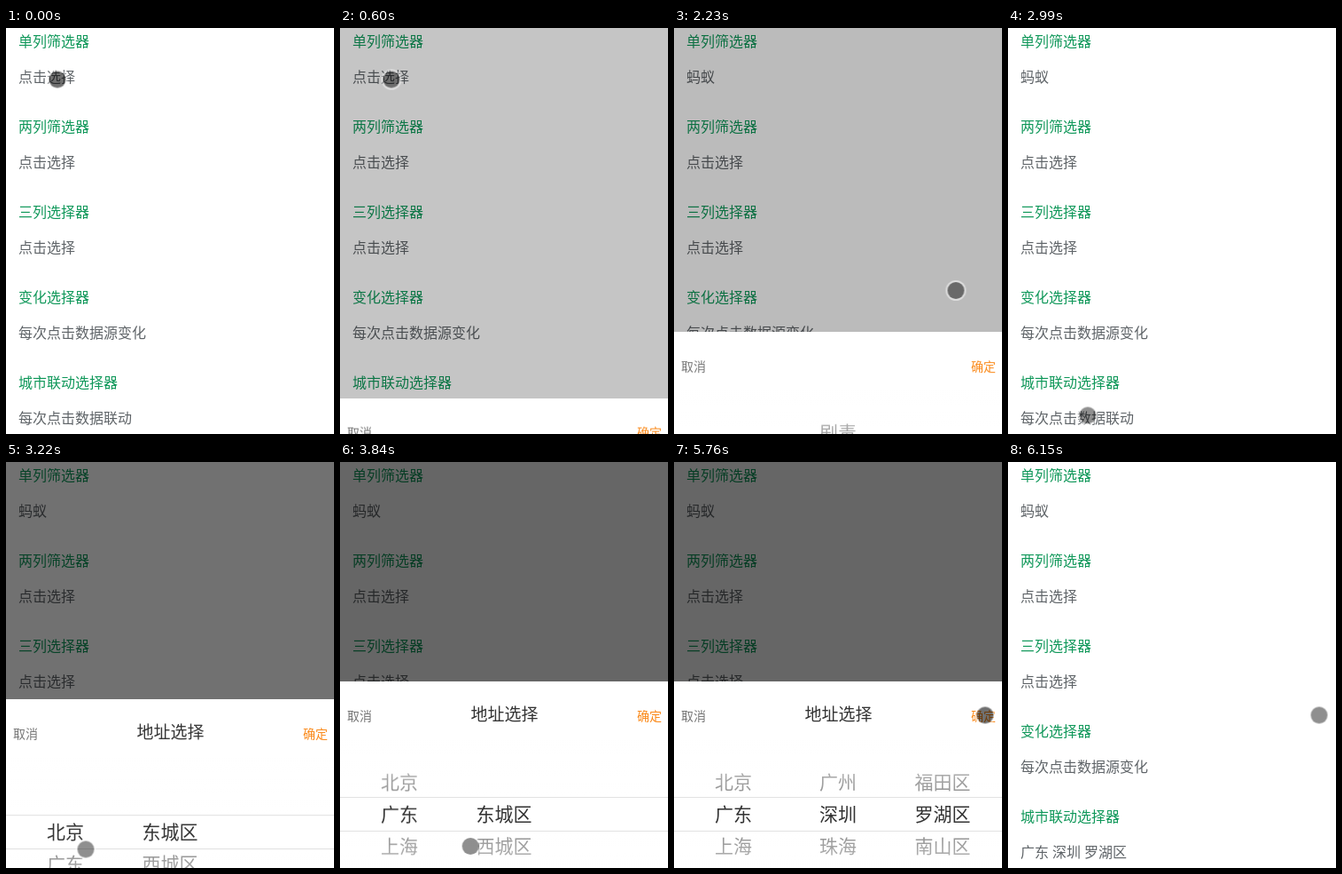
Recreate the animation shown at these times as an HTML page. Size 370 px wide and 457 px high, loop 6310 ms.

```html
<!DOCTYPE html>
<html lang="zh-CN">
<head>
<meta charset="utf-8">
<title>Picker demo</title>
<style>
html, body { margin: 0; width: 100%; height: 100%; overflow: hidden; background: #fff; }
body { position: relative; font-family: "Noto Sans CJK SC", "Noto Sans CJK", "Noto Sans", sans-serif; }
#stage { position: absolute; left: 0; top: 0; width: 370px; height: 457px; overflow: hidden; }
#stage div { position: absolute; white-space: nowrap; }
.head, .value { left: 14px; height: 24px; font-size: 16px; line-height: 24px; }
.head { color: #10985a; }
.value { color: #5f6468; word-spacing: .4px; }
#shade { inset: 0; background: #000; }
#panel { left: 0; top: 247px; width: 370px; height: 273px; background: #fff; }
.button { top: 28px; font-size: 14px; line-height: 20px; }
#cancel { left: 8px; color: #757575; }
#confirm { right: 7px; color: #fa8919; }
.title { top: 23px; width: 371px; text-align: center; font-size: 19px; line-height: 26px; color: #333; }
.wheel { top: 60px; width: 118px; height: 173px; overflow: hidden; }
.list { top: 70px; width: 100%; }
.item { width: 100%; height: 36px; line-height: 36px; font-size: 21px; text-align: center; color: #333; }
.veil { left: 0; width: 100%; height: 70px; }
#upper { top: 60px; border-bottom: 1px solid #e2e2e2;
  background: linear-gradient(to top, rgba(255,255,255,.45), rgba(255,255,255,.85)); }
#lower { top: 168px; border-top: 1px solid #e2e2e2;
  background: linear-gradient(to bottom, rgba(255,255,255,.45), rgba(255,255,255,.85)); }
#cursor { left: -9.5px; top: -9.5px; width: 19px; height: 19px; border-radius: 50%;
  box-shadow: 0 0 0 2px rgba(255,255,255,.5); }
</style>
</head>
<body>
<div id="stage"></div>
<script>
const LOOP = 6310;
const OUT = 'cubic-bezier(.2,.7,.3,1)';
const stage = document.getElementById('stage');

function add(parent, props, text = '') {
  const el = document.createElement('div');
  Object.assign(el, props);
  el.textContent = text;
  parent.append(el);
  return el;
}

// steps: [time, value, easing towards the next step]
function play(el, prop, steps) {
  const all = [...steps, [LOOP, steps[steps.length - 1][1]]];
  const frames = all.map(([time, value, easing = 'linear']) =>
    ({ offset: time / LOOP, [prop]: value, easing }));
  el.animate(frames, { duration: LOOP, iterations: Infinity }).startTime = 0;
}

const hold = (el, prop, steps) =>
  play(el, prop, steps.map(([t, v]) => [t, v, 'steps(1, end)']));

function show(el, from, to = LOOP) {
  const steps = [[0, from === 0 ? 1 : 0]];
  if (from > 0) steps.push([from, 1]);
  if (to < LOOP) steps.push([to, 0]);
  hold(el, 'opacity', steps);
}

// the two times the sheet is open, and the linked changes in between
const visits = [{ open: 530, close: 2164 }, { open: 3020, close: 5840 }];
const CITY = 2700, PROVINCE_SET = 3900, CITY_SET = 4600;

// page
const rows = [
  ['单列筛选器', '点击选择', '蚂蚁', visits[0]],
  ['两列筛选器', '点击选择'],
  ['三列选择器', '点击选择'],
  ['变化选择器', '每次点击数据源变化'],
  ['城市联动选择器', '每次点击数据联动', '广东 深圳 罗湖区', visits[1]]
];
rows.forEach(([head, value, picked, visit], i) => {
  const line = (className, text, dy) => {
    const el = add(stage, { className }, text);
    el.style.top = 96 * i + 2 + dy + 'px';
    return el;
  };
  line('head', head, 0);
  const before = line('value', value, 40);
  if (visit) {
    show(before, 0, visit.close - 40);
    show(line('value', picked, 40), visit.close - 40);
  }
});

// sheet
const shade = add(stage, { id: 'shade' });
const panel = add(stage, { id: 'panel' });
add(panel, { id: 'cancel', className: 'button' }, '取消');
add(panel, { id: 'confirm', className: 'button' }, '确定');
show(add(panel, { className: 'title' }, '地址选择'), CITY);

// go from a to b after each opening and back after each closing
const toggle = (a, b, lead, length) => [[0, a], ...visits.flatMap(({ open, close }) => [
  [open, a, 'ease'], [open + length, b],
  [close - lead, b, 'ease'], [close - lead + length, a]
])];
play(panel, 'transform', toggle('translateY(273px)', 'translateY(0px)', 0, 300));
play(shade, 'opacity', toggle(0, .6, 30, 300));

// a column of choices, scrolled by one item at the given time
function wheel(col, items, from, to, scroll) {
  const box = add(panel, { className: 'wheel' });
  box.style.left = 8 + 118 * col + 'px';
  const list = add(box, { className: 'list' });
  items.split(' ').forEach((text, i) => {
    add(list, { className: 'item' }, text).style.top = 36 * i + 'px';
  });
  show(box, from, to);
  if (scroll) play(list, 'transform', [
    [0, 'translateY(0px)'],
    [scroll, 'translateY(0px)', OUT],
    [scroll + 220, 'translateY(-36px)']
  ]);
}
wheel(1, '剧毒 蚂蚁 幽灵', 0, CITY, 1240);
wheel(0, '北京 广东 上海', CITY, LOOP, 3650);
wheel(1, '东城区 西城区', CITY, PROVINCE_SET);
wheel(1, '广州 深圳 珠海', PROVINCE_SET, LOOP, 4340);
wheel(2, '越秀区 荔湾区', PROVINCE_SET, CITY_SET);
wheel(2, '福田区 罗湖区 南山区', CITY_SET, LOOP, 5030);
add(panel, { id: 'upper', className: 'veil' });
add(panel, { id: 'lower', className: 'veil' });

// touch pointer: arrives, taps, and goes on with a slowing move
const cursor = add(stage, { id: 'cursor' });
const stops = [
  { x: 57.5, y: 57.5, at: 0, tap: 0, go: 840 },
  { x: 162, y: 442, at: 1110, tap: 1200, go: 1350 },
  { x: 334, y: 291, at: 1810, tap: 1900, go: 2100 },
  { x: 317.5, y: 295, at: 2230, go: 2235 },
  { x: 89.5, y: 435.5, at: 2680, tap: 2700, go: 3330 },
  { x: 72, y: 432, at: 3520, tap: 3650, go: 3745 },
  { x: 186, y: 432, at: 4150, tap: 4300, go: 4480 },
  { x: 296.5, y: 429.5, at: 4910, tap: 4985, go: 5170 },
  { x: 350.5, y: 284.5, at: 5520, tap: 5690, go: 6300 }
];
play(cursor, 'transform', stops.flatMap(({ x, y, at, go }) => {
  const place = `translate(${x}px, ${y}px)`;
  return [[at, place], [go, place, OUT]];
}));
hold(cursor, 'backgroundColor', stops.filter(s => 'tap' in s).flatMap(({ tap, go }) => [
  [tap, 'rgba(0,0,0,.56)'],
  [Math.min(tap + 280, go), 'rgba(0,0,0,.44)']
]));
</script>
</body>
</html>
```
